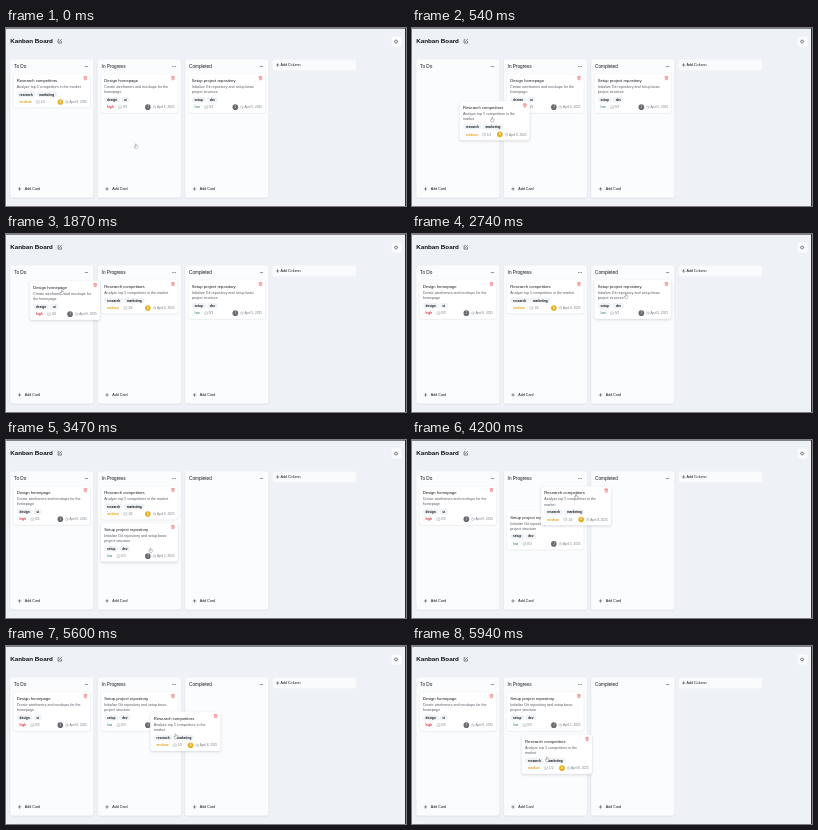
An HTML page with a canvas for the animation above (6.01 s loop, 400 by 178 pixels).

```html
<!DOCTYPE html>
<html lang="en">
<head>
<meta charset="utf-8">
<title>Kanban Board</title>
<style>
html, body { margin: 0; width: 100%; height: 100%; overflow: hidden; background: #eef2f6; }
canvas { display: block; width: 100%; height: 100%; }
</style>
</head>
<body>
<canvas id="stage"></canvas>
<script>
const canvas = document.getElementById('stage');
const ctx = canvas.getContext('2d');
const LOOP = 6010, STEP = 66.6, FRAMES = 90;
const PAGE_W = 1536, UNIT = 400 / PAGE_W;
const FONT = '"Liberation Sans", Arial, sans-serif';
const COL = { x: 16, y: 120, w: 320, h: 532, pitch: 336 };
const CARD = { x: 12, y: 56, w: 296, dragW: 270, pad: 13, gap: 12 };
const INK = '#14171c', MUTED = '#777c85', LINE = '#e6eaee';

const cards = {
  research: { title: 'Research competitors', text: 'Analyze top 5 competitors in the market',
    tags: ['research', 'marketing'], level: 'medium', color: '#e3a21a', done: '1/2',
    date: 'April 8, 2025', avatar: '#e6b01e', initial: 'A' },
  design: { title: 'Design homepage', text: 'Create wireframes and mockups for the homepage',
    tags: ['design', 'ui'], level: 'high', color: '#dc2f3c', done: '0/3',
    date: 'April 6, 2025', avatar: '#686b70', initial: 'J' },
  setup: { title: 'Setup project repository', text: 'Initialize Git repository and setup basic project structure',
    tags: ['setup', 'dev'], level: 'low', color: '#5a9a86', done: '0/3',
    date: 'April 5, 2025', avatar: '#686b70', initial: 'J' }
};
const columnNames = ['To Do', 'In Progress', 'Completed'];
const startColumns = [['research'], ['design'], ['setup']];

// Every dragged card lands at the end of its new column.
const drags = [
  { id: 'research', to: 1, grab: 330, drop: 870, land: 1000 },
  { id: 'design', to: 0, grab: 1400, drop: 2000, land: 2180 },
  { id: 'setup', to: 1, grab: 2800, drop: 3200, land: 3380 },
  { id: 'research', to: 2, grab: 4050, drop: 4420, land: 4600 },
  { id: 'research', to: 1, grab: 5430, drop: 6100, land: 6200 }
];
// Pointer stops: time, x, y in stage pixels.
const pointer = [
  [0, 130, 118], [330, 40, 64], [670, 102, 106], [870, 143, 108], [1040, 143, 108],
  [1340, 127, 57], [1400, 127, 57], [1640, 88, 53], [1870, 56, 58], [2000, 43, 57],
  [2180, 44, 60], [2640, 214, 62], [2800, 214, 62], [3130, 143, 113], [3200, 144.5, 110],
  [3470, 144.5, 110], [3660, 147, 156], [3980, 130, 56], [4050, 130, 56], [4420, 218, 57],
  [4700, 226, 55], [4870, 204, 128], [5060, 104, 124], [5370, 207.6, 70], [5430, 207.6, 70],
  [5800, 128, 112], [5940, 135, 113], [6010, 135, 113]
];

const clamp = v => Math.max(0, Math.min(1, v));
const ease = v => { v = clamp(v); return v * v * (3 - 2 * v); };
const mix = (a, b, k) => a + (b - a) * k;

function pointerAt(t) {
  const i = Math.max(1, pointer.findIndex(p => p[0] >= t));
  const [a, b] = [pointer[i - 1], pointer[i]];
  const k = ease((t - a[0]) / (b[0] - a[0]));
  return { x: mix(a[1], b[1], k) / UNIT, y: mix(a[2], b[2], k) / UNIT };
}

function setFont(size, weight = 400) { ctx.font = `${weight} ${size}px ${FONT}`; }

function label(str, x, midY, size, color = INK, weight = 400, align = 'left') {
  setFont(size, weight);
  ctx.fillStyle = color;
  ctx.textAlign = align;
  ctx.fillText(str, x, midY + size * 0.36);
}

function box(x, y, w, h, r, fill, stroke, shadow) {
  ctx.save();
  ctx.beginPath();
  ctx.roundRect(x, y, w, h, r);
  if (shadow) {
    const k = ctx.getTransform().a;
    ctx.shadowColor = shadow.color;
    ctx.shadowBlur = shadow.blur * k;
    ctx.shadowOffsetY = shadow.dy * k;
  }
  if (fill) { ctx.fillStyle = fill; ctx.fill(); }
  ctx.shadowColor = 'transparent';
  if (stroke) { ctx.strokeStyle = stroke; ctx.lineWidth = 1; ctx.stroke(); }
  ctx.restore();
}

function strokes(color, width, draw) {
  ctx.strokeStyle = color;
  ctx.lineWidth = width;
  ctx.lineCap = ctx.lineJoin = 'round';
  ctx.beginPath();
  draw();
  ctx.stroke();
}

function line(...pts) {
  ctx.moveTo(pts[0], pts[1]);
  for (let i = 2; i < pts.length; i += 2) ctx.lineTo(pts[i], pts[i + 1]);
}

function disc(x, y, r, color) {
  ctx.fillStyle = color;
  ctx.beginPath();
  ctx.arc(x, y, r, 0, Math.PI * 2);
  ctx.fill();
}

function plus(x, y) {
  strokes(INK, 1.7, () => { line(x - 5, y, x + 5, y); line(x, y - 5, x, y + 5); });
}

function trash(x, y) {
  strokes('#ef4b4b', 1.5, () => {
    line(x - 6, y - 4, x + 6, y - 4);
    line(x - 2, y - 4, x - 2, y - 7, x + 2, y - 7, x + 2, y - 4);
    line(x - 5, y - 4, x - 4, y + 7, x + 4, y + 7, x + 5, y - 4);
    line(x - 1.5, y, x - 1.5, y + 4);
    line(x + 1.5, y, x + 1.5, y + 4);
  });
}

function wrap(str, width) {
  setFont(14);
  const lines = [''];
  for (const word of str.split(' ')) {
    const last = lines[lines.length - 1];
    const next = last ? last + ' ' + word : word;
    if (ctx.measureText(next).width <= width) lines[lines.length - 1] = next;
    else lines.push(word);
  }
  return lines;
}

const cardLines = (card, w) => wrap(card.text, w - 2 * CARD.pad);
const cardHeight = (id, w = CARD.w) => 110 + 20 * cardLines(cards[id], w).length;

function badge(str, x, midY, fill, stroke, color) {
  setFont(12, 700);
  const w = ctx.measureText(str).width + 22;
  box(x, midY - 11, w, 22, 11, fill, stroke);
  label(str, x + 11, midY, 12, color, 700);
  return x + w;
}

function drawCard(id, x, y, w, lifted) {
  const card = cards[id], h = cardHeight(id, w), left = x + CARD.pad, right = x + w - CARD.pad;
  const shadow = lifted
    ? { color: 'rgba(15,23,42,.16)', blur: 10, dy: 4 }
    : { color: 'rgba(15,23,42,.1)', blur: 4, dy: 2 };
  box(x, y, w, h, 8, '#fff', LINE, shadow);
  label(card.title, left, y + 25, 16);
  trash(x + w - 19, y + 16);

  const lines = cardLines(card, w);
  lines.forEach((str, i) => label(str, left, y + 49 + i * 20, 14, '#555a63'));

  const tagY = y + 59 + lines.length * 20;
  let tagX = left;
  for (const tag of card.tags) tagX = badge(tag, tagX, tagY, '#f0f3f6', null, INK) + 4;

  const footY = tagY + 29;
  const end = badge(card.level, left, footY, null, '#e6e9ed', card.color);
  strokes(MUTED, 1, () => {
    ctx.rect(end + 9, footY - 5, 10, 10);
    line(end + 11.5, footY, end + 13.5, footY + 2, end + 17, footY - 2);
  });
  label(card.done, end + 24, footY, 12, MUTED);

  label(card.date, right, footY, 12, MUTED, 400, 'right');
  const dateX = right - ctx.measureText(card.date).width;
  strokes(MUTED, 1, () => {
    ctx.arc(dateX - 10, footY, 5.5, 0, Math.PI * 2);
    line(dateX - 10, footY - 3, dateX - 10, footY, dateX - 8, footY + 1);
  });
  disc(dateX - 35, footY, 10.8, card.avatar);
  label(card.initial, dateX - 35, footY, 10, '#fff', 400, 'center');
}

function slot(column, list, index) {
  let y = COL.y + CARD.y;
  for (const id of list.slice(0, index)) y += cardHeight(id) + CARD.gap;
  return { x: COL.x + column * COL.pitch + CARD.x, y };
}

function layout(t) {
  const columns = startColumns.map(list => [...list]);
  const shift = {};
  let held = null;
  for (const d of drags) {
    if (t < d.grab) break;
    const from = columns.findIndex(list => list.includes(d.id));
    const index = columns[from].indexOf(d.id);
    const origin = slot(from, columns[from], index);
    columns[from].splice(index, 1);
    const rise = (cardHeight(d.id) + CARD.gap) * (1 - ease((t - d.grab - 80) / 200));
    columns[from].slice(index).forEach(id => { shift[id] = rise; });
    if (t >= d.land) { columns[d.to].push(d.id); continue; }
    const a = pointerAt(d.grab), p = pointerAt(Math.min(t, d.drop));
    const goal = slot(d.to, columns[d.to], columns[d.to].length);
    const k = ease((t - d.drop) / (d.land - d.drop));
    held = { id: d.id, x: mix(origin.x + p.x - a.x, goal.x, k), y: mix(origin.y + p.y - a.y, goal.y, k) };
  }
  return { columns, shift, held };
}

function drawHeader() {
  label('Kanban Board', 16, 50.5, 24, '#0c0f14', 700);
  strokes(INK, 1.9, () => {
    line(204, 45, 200, 45, 200, 58, 213, 58, 213, 52);
    line(205, 53, 213, 44);
  });
  box(1480, 32, 40, 40, 8, '#fbfcfd', LINE);
  strokes('#4c5057', 1.6, () => {
    for (let i = 0; i < 8; i++) {
      const a = i * Math.PI / 4, c = Math.cos(a), s = Math.sin(a);
      line(1498 + c * 5, 52 + s * 5, 1498 + c * 7, 52 + s * 7);
    }
    ctx.moveTo(1503, 52);
    ctx.arc(1498, 52, 5, 0, Math.PI * 2);
  });
  box(1024, 122, 320, 40, 6, '#fafbfc', '#eef1f4');
  plus(1043, 142);
  label('Add Column', 1054, 142, 14);
}

function drawColumn(name, i) {
  const x = COL.x + i * COL.pitch;
  box(x, COL.y, COL.w, COL.h, 8, '#fbfcfd', '#edf0f3', { color: 'rgba(15,23,42,.12)', blur: 5, dy: 2 });
  label(name, x + 15, 148, 18);
  for (const dx of [-5, 0, 5]) disc(x + 293 + dx, 148, 1.6, INK);
  plus(x + 36, 618);
  label('Add Card', x + 56, 618, 14);
}

function drawHand({ x, y }) {
  ctx.save();
  ctx.translate(x, y);
  ctx.beginPath();
  line(-2, 2, -2, -8, 1, -8, 1, -2, 7, -1, 7, 5, 4, 10, -3, 10, -7, 3, -5, 1);
  ctx.closePath();
  ctx.fillStyle = '#fff';
  ctx.fill();
  ctx.strokeStyle = '#666';
  ctx.lineWidth = 1.4;
  ctx.lineJoin = 'round';
  ctx.stroke();
  ctx.restore();
}

// Dark window border along the top and right.
function drawWindowEdge() {
  const px = 1 / UNIT;
  ctx.fillStyle = '#808388';
  ctx.fillRect(0, 0, PAGE_W, px);
  ctx.fillStyle = '#2a2c30';
  ctx.fillRect(PAGE_W - px, 0, px, 700);
}

function draw(t) {
  ctx.fillStyle = '#eef2f6';
  ctx.fillRect(0, 0, PAGE_W, 700);
  drawHeader();
  columnNames.forEach(drawColumn);

  const { columns, shift, held } = layout(t), hand = pointerAt(t);
  columns.forEach((list, c) => list.forEach((id, i) => {
    const { x, y } = slot(c, list, i), top = y + (shift[id] || 0);
    const hover = !held && hand.x > x && hand.x < x + CARD.w && hand.y > top && hand.y < top + cardHeight(id);
    drawCard(id, x, top, CARD.w, hover);
  }));
  if (held) drawCard(held.id, held.x, held.y, CARD.dragW, true);
  drawHand(hand);
  drawWindowEdge();
}

function fit() {
  const ratio = window.devicePixelRatio || 1;
  canvas.width = Math.round(innerWidth * ratio);
  canvas.height = Math.round(innerHeight * ratio);
  ctx.setTransform(canvas.width / PAGE_W, 0, 0, canvas.width / PAGE_W, 0, 0);
}

const began = performance.now();
function tick() {
  const t = (performance.now() - began) % LOOP;
  draw(Math.min(FRAMES - 1, Math.floor(t / STEP)) * LOOP / FRAMES);
  requestAnimationFrame(tick);
}
addEventListener('resize', fit);
fit();
tick();
</script>
</body>
</html>
```
